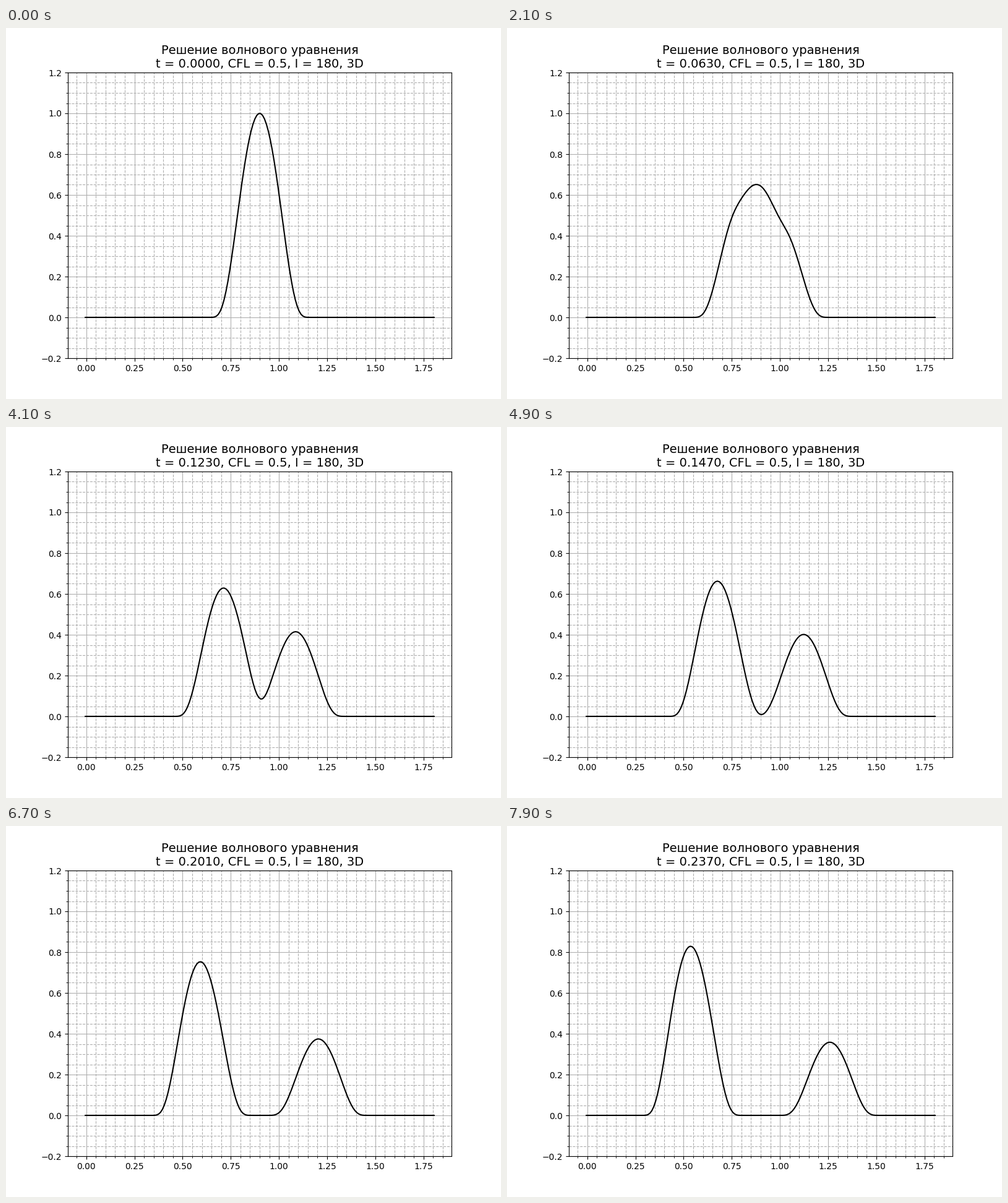
Write a matplotlib script that moves like this. It is 800x600 px and loops after 8000 ms.

```python
import numpy as np
import matplotlib.pyplot as plt
from matplotlib.animation import FuncAnimation

FRAMES, INTERVAL = 80, 100
STEP = 0.003             # model time per frame
SPEED = 1.5              # wave speed
CELLS, H = 180, 0.01
LEFT, RIGHT = 0.6, 1.2   # support of the initial pulse

r = (np.arange(CELLS + 2) - 0.5) * H


def pulse(x):
    """Smooth bump that vanishes outside (LEFT, RIGHT)."""
    d2 = (2 * x - LEFT - RIGHT) ** 2
    gap = (RIGHT - LEFT) ** 2 - d2
    inside = gap > 1e-9
    return np.where(inside, np.exp(-4 * d2 / np.where(inside, gap, 1)), 0)


def wave(t):
    """Spherically symmetric solution with zero initial velocity."""
    a, b = r - SPEED * t, r + SPEED * t
    return (a * pulse(a) + b * pulse(b)) / (2 * r)


fig, ax = plt.subplots(figsize=(8, 6), dpi=100)
line, = ax.plot(r, wave(0), color="black", lw=1.5)
ax.set_ylim(-0.2, 1.2)
ax.minorticks_on()
ax.grid(which="major")
ax.grid(which="minor", linestyle="--")
title = ax.set_title("", fontsize=14)


def draw(i):
    t = i * STEP
    line.set_ydata(wave(t))
    title.set_text("Решение волнового уравнения\n"
                   f"t = {t:.4f}, CFL = 0.5, I = {CELLS}, 3D")
    return line, title


anim = FuncAnimation(fig, draw, frames=FRAMES, interval=INTERVAL,
                     repeat=True, repeat_delay=0)
plt.show()
```
